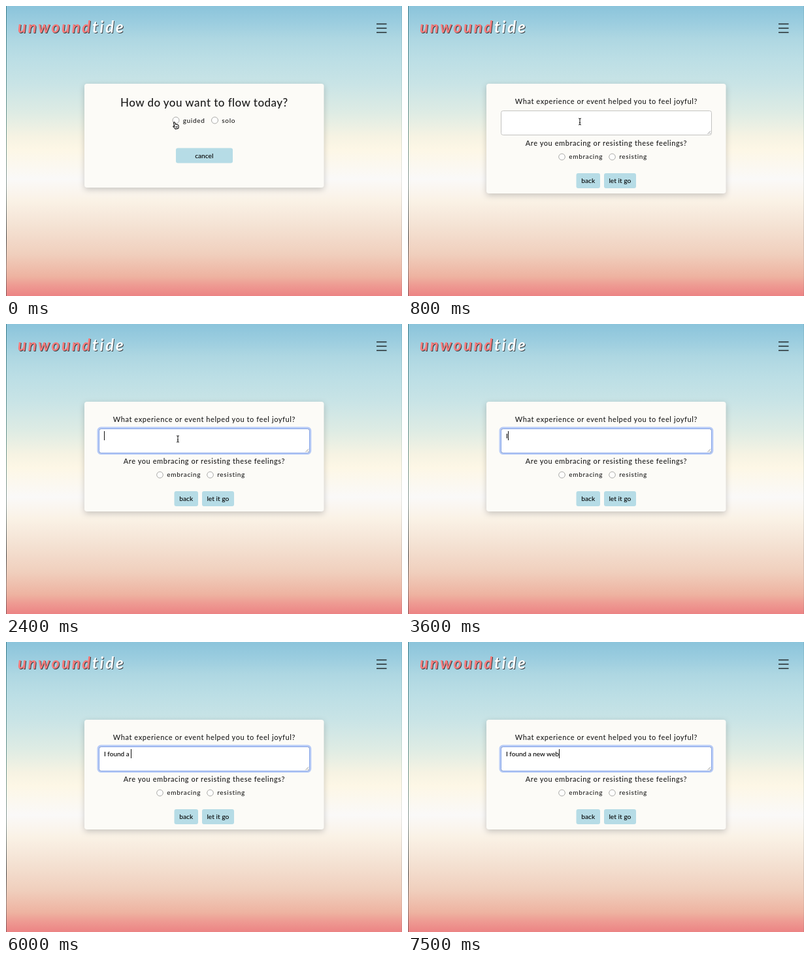
Write an HTML page that moves like this. It is 606 by 444 pixels and loops after 8000 ms.

```html
<!DOCTYPE html>
<html lang="en">
<head>
<meta charset="utf-8">
<title>Guided flow</title>
<style>
  html, body { margin: 0; width: 100%; height: 100%; overflow: hidden; }
  #stage { position: absolute; left: 0; top: 0; width: 606px; height: 444px; overflow: hidden; }
  svg { display: block; }
  svg, #typed { font: 10px Lato, sans-serif; }
  .card { fill: #fcfbf7; filter: drop-shadow(0 3px 5px rgba(0, 0, 0, .2)); }
  .title { font-size: 17px; font-weight: 500; letter-spacing: .45px; fill: #1c1c1c; text-anchor: middle; }
  .question { font-size: 11px; font-weight: 500; letter-spacing: .57px; fill: #1c1c1c; text-anchor: middle; }
  .label { font-weight: 500; letter-spacing: .67px; fill: #1c1c1c; }
  .button { fill: #b6dce6; }
  .caption { font-size: 10.2px; font-weight: 500; fill: #000; text-anchor: middle; }
  .radio { fill: #fefefd; stroke: #a9a9a7; }
  .radio.picked { fill: #d0e7e6; stroke: #b4c4c2; }
  .logo { font-size: 24px; font-weight: 700; font-style: italic; letter-spacing: 2.75px;
          text-shadow: 1px 1px 0 #3c4145; }
  #typed { position: absolute; left: 150px; top: 164px; height: 14px; line-height: 14px;
           font-weight: 500; color: #000; white-space: pre; }
  #caret { position: absolute; left: 100%; top: 0; width: 1px; height: 13.5px; background: #111; }
</style>
</head>
<body>
<div id="stage">
<svg width="606" height="444" viewBox="0 0 606 444">
  <defs>
    <linearGradient id="sky" x2="0" y2="1"></linearGradient>
    <linearGradient id="edge" x2="0" y2="1">
      <stop offset="0" stop-color="#3e7f8c"/>
      <stop offset=".45" stop-color="#719790"/>
      <stop offset=".62" stop-color="#8d9b98"/>
      <stop offset=".8" stop-color="#4d4f50"/>
      <stop offset=".9" stop-color="#95827b"/>
      <stop offset="1" stop-color="#8a5658"/>
    </linearGradient>
  </defs>
  <rect width="606" height="444" fill="url(#sky)"/>
  <rect width="1" height="444" fill="url(#edge)"/>
  <rect x="605" width="1" height="444" fill="url(#edge)" opacity=".2"/>
  <text class="logo" x="18" y="41" fill="#f47c7c">unwound<tspan fill="#fff">tide</tspan></text>
  <path d="M567 27.5H582.5M567 34H582.5M567 40.5H582.5" stroke="#22282b" stroke-width="1.5"/>

  <g id="choice">
    <rect class="card" x="120" y="119" width="366.5" height="159" rx="4"/>
    <text class="title" x="303.3" y="154">How do you want to flow today?</text>
    <circle id="guided" class="radio" cx="260" cy="175" r="5"/>
    <text class="label" x="270.7" y="178.5">guided</text>
    <circle class="radio" cx="319.5" cy="175" r="5"/>
    <text class="label" x="330.3" y="178.5">solo</text>
    <rect class="button" x="260" y="217.5" width="87" height="23" rx="3"/>
    <text class="caption" x="303.3" y="232.5">cancel</text>
  </g>

  <g id="form">
    <rect class="card" x="120" y="119" width="366.5" height="168" rx="4"/>
    <text class="question" x="303.4" y="150.3">What experience or event helped you to feel joyful?</text>
    <rect id="ring" x="141.2" y="159.2" width="324.4" height="39" rx="4" fill="none" stroke="#b7cbf7" stroke-width="3.4"/>
    <rect x="142.5" y="160.5" width="322" height="37" rx="3" fill="#fff" stroke="#c3c3c0"/>
    <rect id="focus" x="142.5" y="160.5" width="322" height="37" rx="3" fill="none" stroke="#87a5e6"/>
    <path d="M458.5 196L463 191.5M461.5 196L463 194.5" stroke="#777" stroke-width=".8"/>
    <text class="question" x="303.4" y="214.3">Are you embracing or resisting these feelings?</text>
    <circle class="radio" cx="235.5" cy="231" r="4.8"/>
    <text class="label" x="246.3" y="234.3">embracing</text>
    <circle class="radio" cx="312.5" cy="231" r="4.8"/>
    <text class="label" x="323.2" y="234.3">resisting</text>
    <rect class="button" x="257.5" y="256" width="36.5" height="23" rx="3"/>
    <text class="caption" x="275.7" y="271">back</text>
    <rect class="button" x="300" y="256" width="49" height="23" rx="3"/>
    <text class="caption" x="324.3" y="271">let it go</text>
  </g>

  <path id="hand" d="M2 1.2Q3.1 .4 3.6 1.6L4.5 4.4Q5.6 3.8 6.2 4.7Q7.3 4.2 7.8 5.2Q9 5 9.2 6.3L9.4 8.4Q9.3 9.5 8.7 10.6L4.4 11.6Q3.5 9.9 1.3 8.3Q.4 7.3 1.7 6.9L3.2 7.7L1.6 2.4Q1.5 1.6 2 1.2ZM5.2 7.5L5.7 9.6M6.9 7.2L7.3 9.2"
        fill="#fff" stroke="#111" stroke-width="1.1"/>
  <path id="beam" d="M-2 -5Q0 -5 0 -3.8Q0 -5 2 -5M0 -4V4M-2 5Q0 5 0 3.8Q0 5 2 5M-1 1.5H1"
        fill="none" stroke="#222" stroke-width="1.1"/>
</svg>
<div id="typed"><span id="words"></span><i id="caret"></i></div>
</div>
<script>
  const LOOP = 8000;
  const MESSAGE = 'I found a new web';
  const KEY_TIMES = [3600, 3800, 4100, 4300, 4600, 4900, 5100, 5200, 5600,
                     5800, 6200, 6400, 6500, 6700, 6900, 7200, 7500];
  const SKY = [[0, '#8bc4db'], [25, '#9bcddf'], [50, '#aed7e2'], [80, '#bbdee5'],
               [120, '#c9e4e6'], [165, '#dfece4'], [200, '#f6f3e3'], [220, '#fdf7e6'],
               [265, '#faf9f8'], [298, '#faf2e6'], [340, '#f4e1d2'], [380, '#f0cfbd'],
               [414, '#eeb3a1'], [427, '#ee9c93'], [444, '#ec8384']];

  const $ = id => document.getElementById(id);
  const show = (id, on) => { $(id).style.visibility = on ? 'visible' : 'hidden'; };
  const moveTo = (id, x, y) => $(id).setAttribute('transform', `translate(${x} ${y})`);
  const ramp = (t, from, to) => Math.min(1, Math.max(0, (t - from) / (to - from)));

  $('sky').innerHTML = SKY.map(([y, color]) =>
    `<stop offset="${y / 444}" stop-color="${color}"/>`).join('');

  function draw(time) {
    const t = Math.floor(time / 100) * 100;
    const onForm = t >= 800;
    show('choice', !onForm);
    show('form', onForm);

    // The pointer glides onto the first option
    const glide = ramp(t, 0, 600);
    show('hand', !onForm);
    moveTo('hand', 254.8 + 4.5 * glide, 176.8 - 3 * glide);
    $('guided').classList.toggle('picked', t >= 500);

    show('beam', onForm && t < 3600);
    moveTo('beam', 263, 177 - ramp(t, 1100, 1300));

    const focus = ramp(t, 2200, 2400);
    $('ring').style.opacity = $('focus').style.opacity = focus;

    $('words').textContent = MESSAGE.slice(0, KEY_TIMES.filter(k => k <= t).length);
    show('caret', t >= 2300 && (t < 2800 || t >= 3300));
  }

  const start = performance.now();
  function tick() {
    draw((performance.now() - start) % LOOP);
    requestAnimationFrame(tick);
  }
  tick();
</script>
</body>
</html>
```
